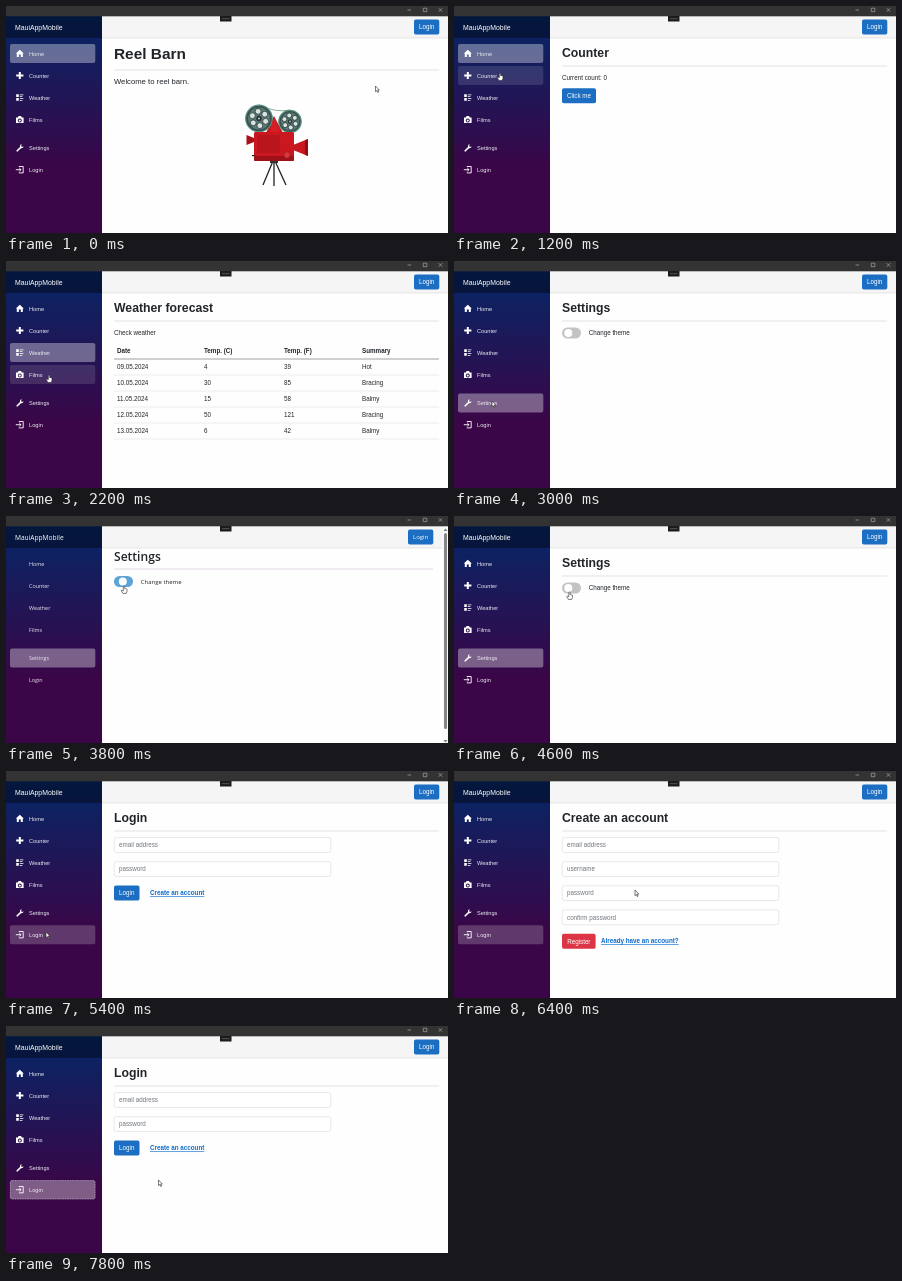
An HTML page that plays this animation: 442 by 227 pixels, repeating every 8 s.

```html
<!DOCTYPE html>
<html lang="en">
<head>
<meta charset="utf-8">
<title>App tour</title>
<style>
html, body { margin: 0; width: 100%; height: 100%; overflow: hidden; }
svg { display: block; width: 100vw; height: 100vh; font: 6.27px "Liberation Sans", Arial, sans-serif; }
svg.plain { font-family: "Open Sans", "Noto Sans", sans-serif; font-size: 6px; }
</style>
</head>
<body>
<svg id="stage" viewBox="0 0 442 227">
  <defs>
    <linearGradient id="side" x1="0" y1="0" x2="0" y2="1">
      <stop offset="0" stop-color="#052767"/>
      <stop offset=".7" stop-color="#3a0647"/>
    </linearGradient>
  </defs>
  <g id="view"></g>
</svg>
<script>
const LOOP = 8000, STEP = 200;
const svg = document.getElementById('stage');
const view = document.getElementById('view');

const LIGHT = { bg: '#fefefe', bar: '#f5f5f5', edge: '#d9d9d9', text: '#212529', line: '#d3d3d6', field: '#fff', hint: '#71777d', head: '#777' };
const DARK = { bg: '#212529', bar: '#2b3035', edge: '#495057', text: '#dee2e6', line: '#495057', field: '#212529', hint: '#9a9fa4', head: '#adb5bd' };
const BLUE = '#1b6ec2';

const PAGES = [[0, 'home'], [1200, 'counter'], [2000, 'weather'], [2400, 'films'], [3000, 'settings'], [5200, 'login'], [6200, 'register'], [7600, 'login']];
const ACTIVE = [[0, 0], [1400, 1], [2000, 2], [2400, 3], [3000, 4], [5200, 5]];
// time, x, y, hand
const CURSOR = [
  [0, 369.5, 80, 0], [1000, 90, 69, 0], [1200, 46, 67, 1], [1600, 124, 88, 1], [1800, 124, 88, 1],
  [2000, 42, 90, 1], [2200, 43, 114, 1], [2400, 43, 114, 1], [2800, 38, 140, 1], [3000, 38, 140, 0],
  [3600, 118, 70, 1], [3800, 118, 70, 1], [4000, 115.5, 76, 1], [4600, 115.5, 76, 1], [4800, 112, 80, 0],
  [5200, 40, 161, 1], [5400, 40, 161, 0], [6000, 171, 120, 1], [6200, 181, 119, 1], [6400, 181, 119, 0],
  [6800, 185, 162, 0], [7000, 185, 166, 1], [7600, 185, 166, 1], [7800, 152.5, 154, 0]
];

const ITEMS = [
  ['Home', 47.5, '<path d="M-4 0 0-3.8 4 0H3V3.6H1V1H-1V3.6H-3V0Z"/>'],
  ['Counter', 69.5, '<path d="M-1-3.6H1V-1H3.6V1H1V3.6H-1V1H-3.6V-1H-1Z"/>'],
  ['Weather', 91.5, '<path d="M-3.6-3.2h2.6v2.6h-2.6zM-3.6.6h2.6v2.6h-2.6zM0-3h3.6v.8H0zM0-1.3h2.6v.8H0zM0 .8h3.6v.8H0zM0 2.5h2.6v.8H0z"/>'],
  ['Films', 113.5, '<path fill-rule="evenodd" d="M-3.8-2h1.8l.8-1.5h2.4L2-2h1.8v5.5h-7.6zM0-1a2 2 0 1 0 .01 0zM0 0a1 1 0 1 1-.01 0z"/>'],
  ['Settings', 142, '<path d="M-3.4 2.4.2-1Q-.3-3.3 2-3.7L1.2-2 2.2-1 3.8-1.8Q3.5.5 1.2.2L-2.2 3.6Q-3.2 4-3.4 2.4Z"/>'],
  ['Login', 163.7, '<path d="M-1-3.2H3.4V3.2H-1M-4 0H1.2M-.6-1.8 1.2 0-.6 1.8" fill="none" stroke="#fff" stroke-width=".9"/>']
];

const WEATHER = [['09.05.2024', 4, 39, 'Hot'], ['10.05.2024', 30, 85, 'Bracing'], ['11.05.2024', 15, 58, 'Balmy'], ['12.05.2024', 50, 121, 'Bracing'], ['13.05.2024', 6, 42, 'Balmy']];
const COLS = [111, 198, 278, 356];

const at = (list, t) => list.filter(k => k[0] <= t).pop()[1];
const text = (x, y, s, fill, more = '') => `<text x="${x}" y="${y}" fill="${fill}" ${more}>${s}</text>`;
const rect = (x, y, w, h, fill, more = '') => `<rect x="${x}" y="${y}" width="${w}" height="${h}" fill="${fill}" ${more}/>`;
const disc = (x, y, r, fill, more = '') => `<circle cx="${x}" cy="${y}" r="${r}" fill="${fill}" ${more}/>`;
const path = (d, fill, more = '') => `<path d="${d}" fill="${fill}" ${more}/>`;
const rule = (x, y, end, color, w = .7) => rect(x, y - w / 2, end - x, w, color);
const button = (x, y, w, s, fill = BLUE) => rect(x, y, w, 15, fill, 'rx="1.8"') + text(x + w / 2, y + 9.7, s, '#fff', 'text-anchor="middle"');
const link = (x, y, s, hover) => text(x, y, s, hover ? '#0a58ca' : '#0b6bcb', 'font-weight="700" text-decoration="underline"');

function title(s, c) {
  return text(108, 50.6, s, c.text, 'font-size="12.25" font-weight="700"') + rule(108, 60, 433, c.line);
}

function fields(names, c) {
  return names.map((s, i) => {
    const y = 66.6 + i * 24.1;
    return rect(108.2, y, 216.5, 14.8, c.field, 'rx="2" stroke="#d5d9dd" stroke-width=".6"') + text(113, y + 9.6, s, c.hint);
  }).join('');
}

function reel(x, y, r) {
  let s = disc(x, y, r, '#36514f', 'stroke="#5b9184" stroke-width="1.2"') + disc(x, y, r * .82, '#5d7775');
  for (let i = 0; i < 6; i++) {
    const a = i * Math.PI / 3 + .4;
    s += disc(x + Math.cos(a) * r * .54, y + Math.sin(a) * r * .54, r * .22, '#d9e4df', 'stroke="#263b3a" stroke-width=".8"');
  }
  return s + disc(x, y, r * .2, '#223534') + disc(x, y, r * .08, '#b8c9c3');
}

function camera() {
  return path('M267 155 257 179M268 155V180M269 155 280 179', 'none', 'stroke="#222" stroke-width="1.3"') +
    rect(264, 153, 8, 4, '#333') +
    path('M253 99Q270 107 284 104', 'none', 'stroke="#7ba889" stroke-width=".9"') +
    path('M260 127 268 110 277 127Z', '#c4161d') +
    reel(253, 112.5, 13.3) + reel(284, 115.5, 11.2) +
    path('M263 127 268 111 275 127Z', '#d51d24') +
    path('M240.5 129 248 132V136L240.5 139Z', '#a51218') +
    path('M287 139 302 133V150L287 144Z', '#c8171e') +
    path('M299 134.2 302 133V150L299 148.8Z', '#8c1015') +
    rect(248, 126, 40, 29, '#cb1820', 'rx="1.5"') +
    rect(248, 150, 40, 5, '#9c1218', 'rx="1.5"') +
    rect(251, 129, 23, 18, '#b9151c') +
    disc(281, 149, 3.2, '#d93840', 'stroke="#8c1015" stroke-width=".6"') +
    rect(246, 149, 3, 1.2, '#222');
}

function toggle(y, fill, knob) {
  return rect(108, y - 5.5, 19, 11, fill, 'rx="5.5"') + disc(knob, y, 4, '#fff');
}

const draw = {
  home: (t, c) => text(108, 53.2, 'Reel Barn', c.text, 'font-size="15.4" font-weight="700"') +
    rule(108, 64, 433, c.line) + text(108, 77.8, 'Welcome to reel barn.', c.text, 'font-size="7.7"') + camera(),
  counter: (t, c) => title('Counter', c) +
    text(108, 73.6, 'Current count: ' + (t < 1600 ? 0 : t < 1800 ? 1 : 2), c.text) + button(108, 82.2, 34, 'Click me'),
  weather: (t, c) => title('Weather forecast', c) + text(108, 73.6, 'Check weather', c.text) +
    ['Date', 'Temp. (C)', 'Temp. (F)', 'Summary'].map((s, i) => text(COLS[i], 92.2, s, c.text, 'font-weight="700"')).join('') +
    rule(108, 98, 433, c.head) +
    WEATHER.map((row, r) => row.map((s, i) => text(COLS[i], 108.2 + r * 16, s, c.text)).join('') + rule(108, 114 + r * 16, 433, '#dee2e6')).join(''),
  films: (t, c) => title('Films', c),
  settings: (t, c) => title('Settings', c) +
    (c === DARK ? toggle(72, '#5ba3d9', 121) : toggle(72, '#c3c3c6', 114.3)) + text(134.7, 74.3, 'Change theme', c.text),
  login: (t, c) => title('Login', c) + fields(['email address', 'password'], c) +
    button(108, 114.6, 25.5, 'Login') + link(144, 124.4, 'Create an account', t >= 6000 && t < 6200),
  register: (t, c) => title('Create an account', c) + fields(['email address', 'username', 'password', 'confirm password'], c) +
    button(108, 162.8, 33.6, 'Register', '#dc3545') + link(147, 172.2, 'Already have an account?', t >= 7000)
};

// Settings while the style sheet is being swapped
function swapping(c) {
  return text(108, 44.6, 'Settings', c.text, 'font-size="12.1" font-weight="600"') + rule(108, 53, 427, '#d3c8d6') +
    toggle(65.5, '#5ba3d9', 116.8) + text(134.7, 67.9, 'Change theme', c.text) +
    rect(436.5, 10, 5.5, 217, '#fafafa') + rect(438, 17, 3, 196, '#858585', 'rx="1.5"') +
    path('M437.6 15 439.5 12.4 441.4 15ZM437.6 224 439.5 226.5 441.4 224Z', '#777');
}

function sidebar(t, cur, plain) {
  const active = at(ACTIVE, t);
  let s = rect(0, 10, 96, 217, 'url(#side)') + rect(0, 10, 96, 22, '#000', 'opacity=".4"') +
    text(9, 23.6, 'MauiAppMobile', '#fff', `font-size="${plain ? 6.6 : 6.9}"`);
  ITEMS.forEach(([name, y, icon], i) => {
    const over = cur.x < 90 && Math.abs(cur.y + 1 - y) < 9.5;
    const fresh = i === 5 && t < 7600;
    const alpha = i === active ? (fresh ? .2 : .35) : over ? .12 : 0;
    if (alpha) s += rect(4, y - 9.5, 85.3, 19, '#fff', `rx="2" opacity="${alpha}"`);
    if (i === 5 && t >= 7600) s += rect(4.3, y - 9.2, 84.7, 18.4, 'none', 'rx="2" stroke="#c9b9cc" stroke-width=".5" stroke-dasharray="1.5 1"');
    if (!plain) s += `<g transform="translate(13.8 ${y})" fill="#fff">${icon}</g>`;
    s += text(23, y + 2.1, name, '#ececf2', `font-size="${plain ? 5.4 : 5.65}"`);
  });
  return s;
}

function chrome() {
  return rect(0, 0, 442, 10.3, '#333') +
    path('M401.5 4H405M417.3 2.2H420.8V5.7H417.3ZM432.7 2.2 436.2 5.7M436.2 2.2 432.7 5.7', 'none', 'stroke="#bbb" stroke-width=".6"') +
    rect(214, 10, 11.5, 5.5, '#1c1c1c') + rule(216, 12.8, 223.5, '#777', .6);
}

function cursorAt(t) {
  const i = CURSOR.findLastIndex(k => k[0] <= t);
  const [t0, x0, y0, hand] = CURSOR[i];
  const [t1, x1, y1] = CURSOR[i + 1] || [LOOP, x0, y0];
  const p = (t - t0) / (t1 - t0), e = p * p * (3 - 2 * p);
  return { x: x0 + (x1 - x0) * e, y: y0 + (y1 - y0) * e, hand };
}

function pointer({ x, y, hand }) {
  const d = hand
    ? 'M-.7.4Q0-.5.7.4V2.6Q1.5 2.2 1.9 2.9 2.9 2.6 3 3.6V5.3L2.2 7.4H-1.1L-2.8 4.6Q-2.4 3.6-.7 4.7Z'
    : 'M0 0V5.6L1.3 4.5 2.2 6.5 3.1 6.1 2.2 4.1H3.8Z';
  return path(d, '#fff', `transform="translate(${x} ${y})" stroke="#222" stroke-width=".6" stroke-linejoin="round"`);
}

function render(t) {
  const plain = t >= 3800 && t < 4000;
  const c = t >= 4000 && t < 4600 ? DARK : LIGHT;
  const cur = cursorAt(t);
  svg.classList.toggle('plain', plain);
  view.innerHTML = rect(96, 10, 346, 217, c.bg) + rect(96, 10, 346, 22, c.bar) + rule(96, 32, 442, c.edge) +
    button(plain ? 402 : 408, 13.6, 25.3, 'Login') +
    (plain ? swapping(c) : draw[at(PAGES, t)](t, c)) +
    sidebar(t, cur, plain) + chrome() + pointer(cur);
}

let last = -1;
function tick() {
  const t = Math.floor(performance.now() % LOOP / STEP) * STEP;
  if (t !== last) render(last = t);
  requestAnimationFrame(tick);
}
tick();
</script>
</body>
</html>
```
